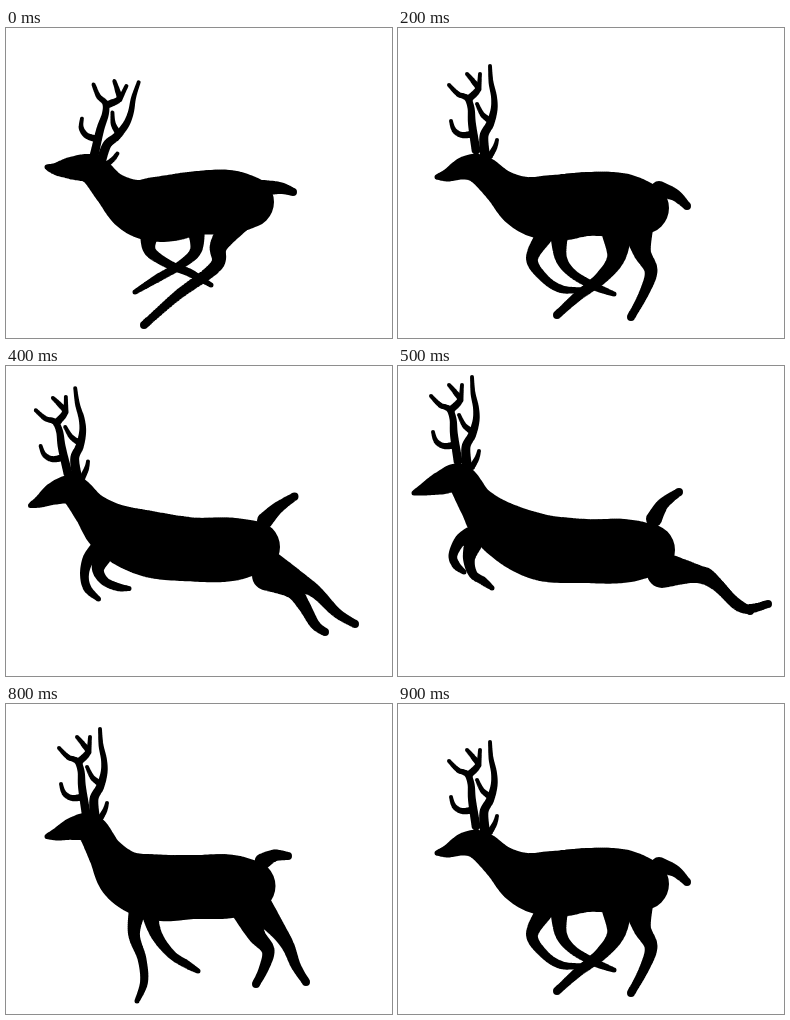
An HTML page with a canvas that plays this animation: 386x310 px, repeating every 1000 ms.

```html
<!DOCTYPE html>
<html lang="en">
<head>
<meta charset="utf-8">
<title>Running deer</title>
<style>
  html, body { margin: 0; overflow: hidden; background: #fff; }
  canvas { display: block; }
</style>
</head>
<body>
<canvas id="stage" width="386" height="310"></canvas>
<script>
const ctx = document.getElementById('stage').getContext('2d');
const STEP = 100;

// Thickness along each part, shared by all poses
const SPINE = [2.5, 6.5, 11.5, 15, 18, 27, 33, 32, 32, 26]; // nose to rump
const TAIL = [8, 6, 4];
const FORE = [9, 6, 4.5, 4, 2.5];
const HIND = [15, 9, 6.5, 5, 4];
const PARTS = [SPINE, TAIL, FORE, FORE, HIND, HIND];

const parse = text => text.split(',').map(p => p.trim().split(' ').map(Number));
const mix = (a, b) => Array.isArray(a) ? a.map((v, i) => mix(v, b[i])) : (a + b) / 2;

// rack: position and tilt of the antlers; parts: joints in the order of PARTS
const pose = (rack, ...parts) => ({ rack, parts: parts.map(parse) });
const between = (a, b) => ({ rack: mix(a.rack, b.rack), parts: mix(a.parts, b.parts) });

const gather = pose([99, 127, 22],
  '41 139, 51 141, 67 140, 87 142, 106 162, 130 179, 156 181, 192 175, 222 174, 242 174',
  '256 160, 274 160, 287 164',
  '143 207, 144 223, 162 236, 184 245, 205 257',
  '190 200, 190 222, 176 236, 152 250, 129 264',
  '232 190, 213 217, 210 238, 172 267, 138 297');
const stride = pose([88, 118, 0],
  '39 149, 50 147, 67 140, 83 142, 104 160, 128 176, 155 180, 190 176, 222 177, 245 180',
  '261 161, 277 167, 289 178',
  '146 208, 134 231, 146 250, 163 261, 184 262',
  '161 206, 163 230, 175 246, 198 259, 216 266',
  '219 205, 218 230, 203 250, 180 268, 159 287',
  '240 200, 244 224, 253 243, 246 265, 233 289');
const push = pose([73, 113.5, -9],
  '33 152, 43 147, 56 137, 73 136, 92 151, 115 168, 146 175, 185 182, 220 182, 245 178',
  '262 156, 278 146, 296 135',
  '114 195, 103 211, 102 228, 105 246, 119 260',
  '118 203, 113 214, 122 222, 138 227, 152 223',
  '258 212, 274 238, 276 258, 274 275, 268 294',
  '268 202, 291 226, 310 243, 328 261, 346 271');
const leap = pose([70, 91, 0],
  '16 127, 27 123, 43 117, 62 113, 79 138, 102 162, 142 181, 188 185, 225 185, 251 184',
  '256 153, 265 138, 281 126',
  '72 170, 62 175, 55 189, 58 199, 66 206',
  '75 178, 71 193, 75 208, 85 215, 94 222',
  '264 207, 297 208, 318 218, 344 242, 370 238',
  '262 200, 300 208, 312 211, 334 233, 352 245');
const descend = pose([92, 92, 0],
  '43 116, 53 113, 69 109, 87 108, 97 141, 112 172, 146 187, 190 190, 222 188, 242 184',
  '252 154, 260 136, 275 126',
  '130 205, 127 226, 133 241, 155 249, 181 248',
  '128 205, 130 228, 130 238, 150 247, 171 250',
  '255 207, 298 216, 317 229, 340 255, 355 265',
  '262 205, 303 215, 313 222, 330 240, 348 260');
const land = between(descend, stride);
land.parts.splice(2, 4, ...[
  '132 203, 128 230, 136 255, 138 278, 131 297',
  '142 203, 150 230, 165 250, 180 260, 192 267',
  '250 200, 270 224, 282 242, 290 262, 300 278',
  '240 205, 250 230, 262 246, 258 264, 250 280'
].map(parse));

const cycle = [gather, gather, stride, push, between(push, leap),
  leap, leap, descend, land, stride];

// Tip first, around the crown of the head; the last one is the ear
const antlers = [
  '4 -80, 5 -64, 8 -49, 8 -36, 4 -22, -2 -10, -1 10',
  '-37 -61, -28 -52, -19 -48, -15 -38, -14 -22, -10 4',
  '-35 -25, -32 -16, -24 -11, -13 -12',
  '-19 -72, -13 -65, -8 -57, -16 -48',
  '-6 -72, -7 -57',
  '-9 -42, -4 -32, 3 -26',
  '11 -6, 9 1, 4 10'
].map(parse);

// Sweeps a disc of changing radius along a Catmull-Rom curve through the joints
function sweep(joints, radius) {
  const points = joints.map((p, i) => [...p, radius(i)]);
  const last = points.length - 1;
  const at = i => points[Math.min(last, Math.max(0, i))];
  ctx.beginPath();
  for (let i = 0; i < last; i++) {
    const [a, b, c, d] = [at(i - 1), at(i), at(i + 1), at(i + 2)];
    for (let t = 0; t <= 1; t += 1 / 16) {
      const [x, y, r] = b.map((v, k) => v + t / 2 * (c[k] - a[k] +
        t * (2 * a[k] - 5 * v + 4 * c[k] - d[k] + t * (3 * (v - c[k]) + d[k] - a[k]))));
      ctx.moveTo(x + r, y);
      ctx.arc(x, y, r, 0, 2 * Math.PI);
    }
  }
  ctx.fill();
}

function drawDeer({ rack: [x, y, tilt], parts }) {
  ctx.clearRect(0, 0, 386, 310);
  parts.forEach((joints, part) => sweep(joints, i => PARTS[part][i]));
  ctx.save();
  ctx.translate(x, y);
  ctx.rotate(tilt * Math.PI / 180);
  antlers.forEach(joints => sweep(joints, i => 2 + i / 2));
  ctx.restore();
}

function tick() {
  drawDeer(cycle[Math.floor(performance.now() / STEP) % cycle.length]);
  requestAnimationFrame(tick);
}
tick();
</script>
</body>
</html>
```
